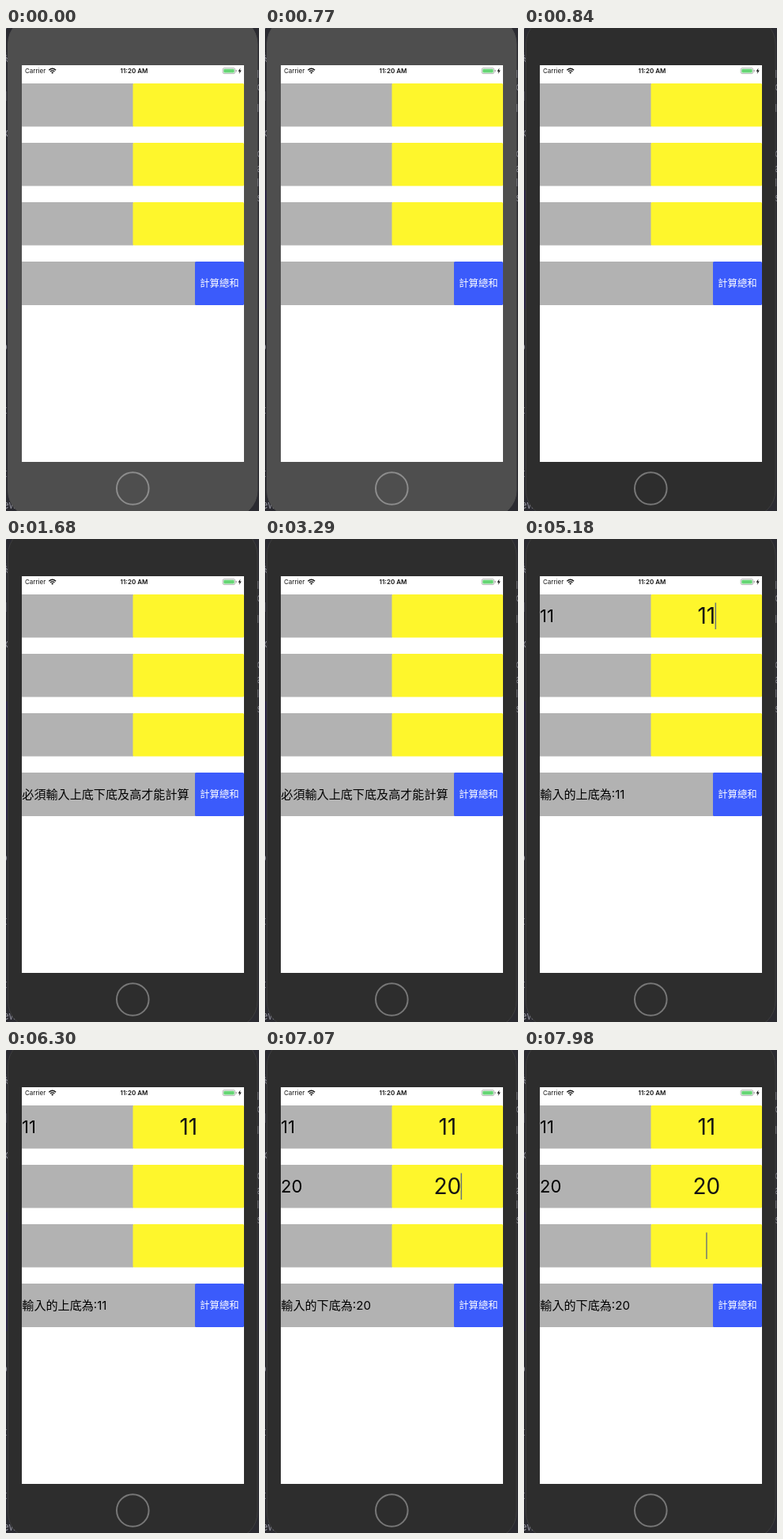
An HTML page for the animation above (8 s loop, 320x610 px).

```html
<!DOCTYPE html>
<html lang="zh-Hant">
<head>
<meta charset="utf-8">
<style>
  html, body { margin: 0; width: 100%; height: 100%; overflow: hidden; background: #2b2b31; }
  svg { display: block; width: 320px; height: 610px; }
  text { font-family: Inter, "Noto Sans CJK TC", "Noto Sans CJK", sans-serif; white-space: pre; }
  .edge { font-size: 13px; fill: #8d8d98; }
  .status { font-size: 8px; fill: #111; }
  .label { font-size: 22px; }
  .field { font-size: 28px; text-anchor: middle; fill: #141414; }
  .result { font-size: 15.1px; }
  .button { font-size: 12.4px; font-weight: 300; fill: #fff; }
</style>
</head>
<body>
<svg viewBox="0 0 320 610">
  <rect width="320" height="610" fill="#2b2b31"/>
  <rect y="205" width="3" height="150" fill="#292443"/>
  <g class="edge" id="edge"></g>
  <rect id="phone" x="2.5" y="-14" width="315.5" height="632" rx="34"/>
  <circle id="home" cx="160.3" cy="581.5" r="20.3" fill="none" stroke-width="2"/>
  <rect x="20" y="47" width="281" height="501" fill="#fff"/>

  <g class="status">
    <text x="24" y="57">Carrier</text>
    <text x="162" y="57" text-anchor="middle" font-weight="600">11:20 AM</text>
    <g fill="none" stroke="#111" stroke-width="1.4">
      <path d="M54.3 53.2Q58.7 49.4 63.1 53.2M56 55Q58.7 52.8 61.4 55"/>
    </g>
    <path d="M57.2 56.2Q58.7 55 60.2 56.2L58.7 57.8Z"/>
    <rect x="274.2" y="50.6" width="15.6" height="7" rx="1.8" fill="#fff" stroke="#9a9a9a" stroke-width=".7"/>
    <rect x="275.3" y="51.7" width="13.4" height="4.8" rx="1" fill="#66d675"/>
    <rect x="290.6" y="52.8" width="1" height="2.6" rx=".5" fill="#9a9a9a"/>
    <path d="M296.5 50.5L293.6 54.7H295.5L294.8 58L297.8 53.5H295.9Z"/>
  </g>

  <g id="rows"></g>
  <rect x="20" y="295" width="220" height="55" fill="#b2b2b2"/>
  <rect x="239" y="295" width="62" height="55" rx="1.5" fill="#3b5bfb"/>
  <text class="result" id="result" x="20.3" y="328.4"></text>
  <text class="button" x="245.2" y="327.2">計算總和</text>
  <rect id="caret" width="1.5" height="33.5" fill="#6c7678"/>
</svg>
<script>
  const LOOP = 8000, ACTIVE = 840, CALC = 910;
  const CENTER = 230.8;
  const $ = id => document.getElementById(id);

  // Each event: time, focused row, text typed so far in that row
  const events = [
    [4480, 0, ''], [4760, 0, '1'], [5180, 0, '11'],
    [5320, 1, ''], [6510, 1, '2'], [6930, 1, '20'],
    [7280, 2, '']
  ];
  const names = ['上底', '下底', '高'];

  // Letters of the window behind, peeking out beside the phone
  const scraps = [[-4, 8, 'r'], [-10, 42, '係'], [-3, 90, ']'], [-4, 137, 'x'], [-6, 367, 'l'],
    [-6, 407, 'o'], [-3, 487, 't'], [-3, 567, 't'], [-4, 607, 'ew'],
    [317, 63, 'l'], [317, 79, 'c'], [317, 106, 'l'], [317, 163, 'c'],
    [317, 182, 'a'], [317, 200, 'l'], [317, 219, 's']];
  $('edge').innerHTML = scraps.map(([x, y, s]) => `<text x="${x}" y="${y}">${s}</text>`).join('');

  $('rows').innerHTML = names.map((_, i) => {
    const y = 70 + 75 * i;
    return `<rect x="20" y="${y}" width="141" height="54.5" fill="#b2b2b2"/>
      <rect x="160.5" y="${y}" width="140.5" height="54.5" rx="1.5" fill="#fef62c"/>
      <text class="label" x="20" y="${y + 35}"></text>
      <text class="field" x="${CENTER}" y="${y + 37}"></text>`;
  }).join('');
  const labels = [...document.querySelectorAll('.label')];
  const fields = [...document.querySelectorAll('.field')];

  function draw(t) {
    const active = t >= ACTIVE;
    $('phone').setAttribute('fill', active ? '#2d2d2d' : '#4e4e4e');
    $('phone').setAttribute('stroke', active ? '#3d3d3d' : '#4e4e4e');
    $('home').setAttribute('stroke', active ? '#777' : '#8c8c8c');

    const values = ['', '', ''];
    let message = t < CALC ? '' : '必須輸入上底下底及高才能計算';
    let row = -1, since = 0;
    for (const [time, r, value] of events) {
      if (t < time) break;
      row = r;
      since = time;
      values[r] = value;
      if (value) message = `輸入的${names[r]}為:${value}`;
    }
    $('result').textContent = message;
    values.forEach((v, i) => labels[i].textContent = fields[i].textContent = v);

    // The caret stays solid after each event, then fades away
    const caret = $('caret');
    const alpha = Math.max(0, Math.min(1, (950 - (t - since)) / 260));
    caret.setAttribute('opacity', row < 0 ? 0 : alpha);
    if (row >= 0) {
      const width = values[row] ? fields[row].getComputedTextLength() : 0;
      caret.setAttribute('x', CENTER - 0.6 + width / 2);
      caret.setAttribute('y', 80.5 + 75 * row);
    }
  }

  function tick() {
    draw(performance.now() % LOOP);
    requestAnimationFrame(tick);
  }
  tick();
</script>
</body>
</html>
```
